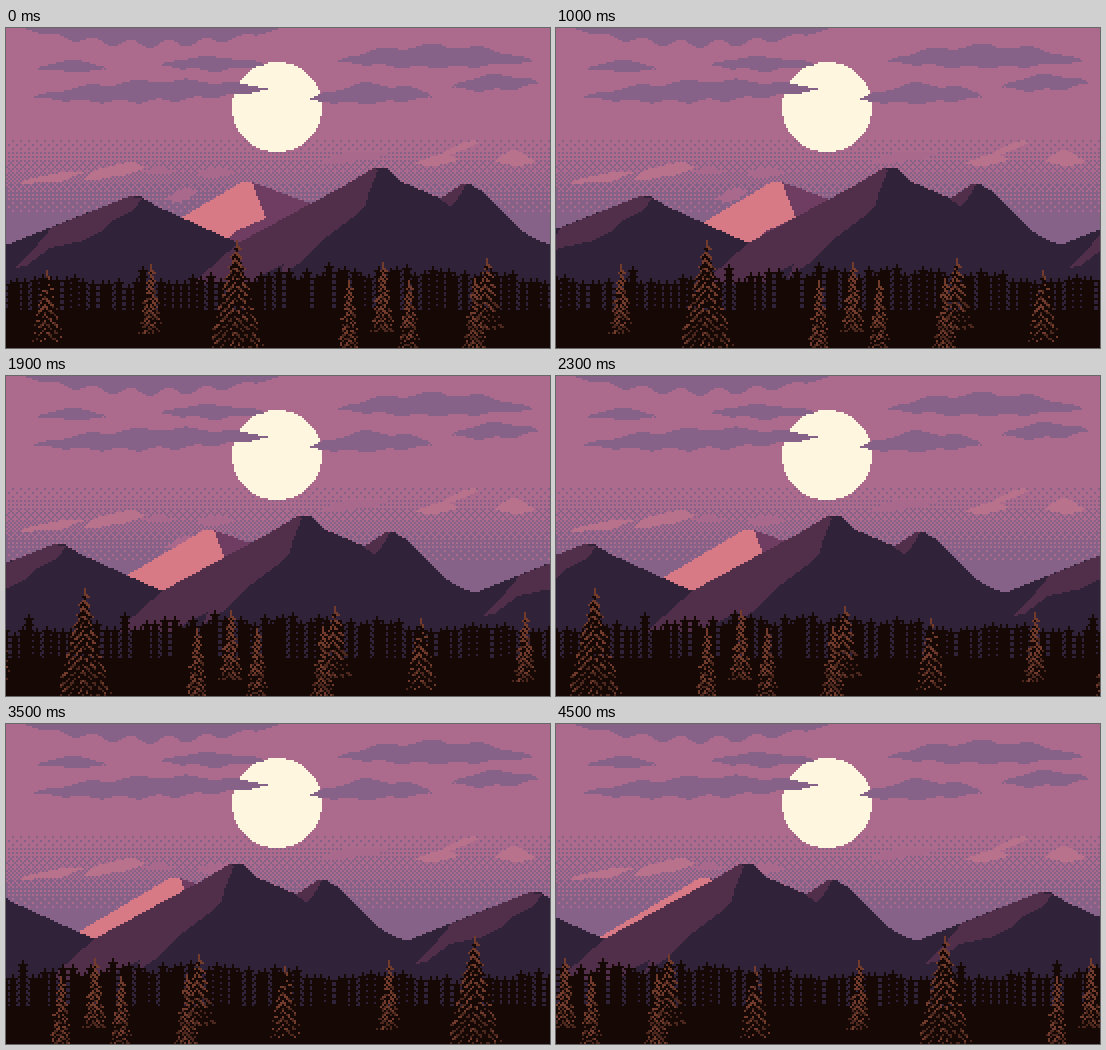
Recreate the animation shown at these times as an HTML page with a canvas. Size 544x320 px, loop 4.6 s.

```html
<!DOCTYPE html>
<html>
<head>
<meta charset="utf-8">
<style>
html, body { margin: 0; width: 100%; height: 100%; overflow: hidden; background: #ac6b8c; }
canvas { display: block; width: 544px; height: 320px; image-rendering: pixelated; }
</style>
</head>
<body>
<canvas id="stage" width="272" height="160"></canvas>
<script>
const W = 272, H = 160, FRONT = 263;
const SKY = '#ac6b8c', DUSK = '#866289', MOON = '#fff6e0', GLOW = '#b9728c', HAZE = '#a8698c';
const ROSE = '#d87a85', PLUM = '#6e3d61', MAUVE = '#512e4a', NIGHT = '#2f2239';
const BLACK = '#160805', BARK = '#733b2c', BARK_DARK = '#4c271d';

let seed = 7;
const rnd = () => (seed = seed * 16807 % 2147483647) / 2147483647;

function layer(width, draw) {
  const c = document.createElement('canvas');
  c.width = width;
  c.height = H;
  draw(c.getContext('2d'));
  return c;
}

// Hard-edged polygon; points are in stage pixels, two per cell.
function poly(g, color, text) {
  const n = text.split(/[ ,]+/).map(v => v / 2);
  g.fillStyle = color;
  for (let y = 0; y < H; y++) {
    const cuts = [], m = y + 0.5;
    for (let i = 0; i < n.length; i += 2) {
      const j = (i + 2) % n.length;
      const [x1, y1, x2, y2] = [n[i], n[i + 1], n[j], n[j + 1]];
      if ((y1 <= m) !== (y2 <= m)) cuts.push(Math.round(x1 + (m - y1) * (x2 - x1) / (y2 - y1)));
    }
    cuts.sort((a, b) => a - b);
    for (let i = 0; i + 1 < cuts.length; i += 2) g.fillRect(cuts[i], y, cuts[i + 1] - cuts[i], 1);
  }
}

// Lens with lumpy edges: rises by up, hangs by down, climbs by lift from left to right.
function cloud(g, color, x, y, w, up, down, lift = 0) {
  g.fillStyle = color;
  for (let i = 0; i < w; i++) {
    const u = (i + 0.5) / w, bulge = Math.sin(Math.PI * u) ** 0.7;
    const mid = y - lift * u;
    const top = Math.round(mid - up * bulge * (0.85 + 0.15 * Math.sin(i / 4 + x)));
    const bottom = Math.round(mid + down * bulge * (0.8 + 0.2 * Math.sin(i / 3 + y)));
    g.fillRect(x + i, top, 1, Math.max(1, bottom - top));
  }
}

// 4x4 ordered dither threshold, 0 to 15.
function bayer(x, y) {
  const quad = (a, b) => 2 * ((a ^ b) & 1) + (b & 1);
  const low = quad(y, x ^ y ^ y), high = quad(y >> 1, x >> 1);
  return 4 * ((low & 1) !== ((low >> 1) & 1) ? (y & 1 ? 3 : 2) : (y & 1 ? 1 : 0)) +
    ((high & 1) !== ((high >> 1) & 1) ? 2 : 0) + ((x ^ y) >> 1 & 1 ? 0 : (y >> 1 & 1));
}

const sky = layer(W, g => {
  g.fillStyle = SKY;
  g.fillRect(0, 0, W, H);
  g.fillStyle = DUSK;
  for (let y = 56; y < H; y++) {
    const level = Math.floor(Math.min(1, (y - 50.8) / 41) * 8) * 2;
    for (let x = 0; x < W; x++) {
      // Interleave the bits of the cell: fine parity weighs most.
      const a = x + 1, d = a ^ y;
      const rank = (d & 1) * 8 + (y & 1) * 4 + (d >> 1 & 1) * 2 + (y >> 1 & 1);
      if (reorder(rank) < level) g.fillRect(x, y, 1, 1);
    }
  }
  g.fillStyle = MOON;
  for (let d = -22; d <= 22; d++) {
    const r = Math.floor(Math.sqrt(22.5 ** 2 - d * d));
    g.fillRect(135 - r, 39 + d, 2 * r + 1, 1);
  }
  cloud(g, DUSK, 10, 0, 126, 0, 10);
  cloud(g, DUSK, 16, 20, 34, 4, 2.5);
  cloud(g, DUSK, 14, 34.5, 117, 7, 5, 4);
  cloud(g, DUSK, 78, 18, 51, 4, 4);
  cloud(g, DUSK, 166, 16.5, 97, 9, 4);
  cloud(g, DUSK, 152, 36, 61, 8, 3, 2);
  cloud(g, DUSK, 223, 29, 43, 5, 4, 2);
  cloud(g, HAZE, 70, 72, 13, 3, 2);
  cloud(g, HAZE, 95, 74, 20, 4, 2, 2);
  cloud(g, HAZE, 80, 86, 15, 4, 3, 4);
  cloud(g, HAZE, 156, 68, 35, 4, 2, 5);
  cloud(g, GLOW, 8, 77, 31, 2, 3, 5);
  cloud(g, GLOW, 39, 76, 30, 6, 2, 6);
  cloud(g, GLOW, 205, 68, 21, 4, 2, 2);
  cloud(g, GLOW, 217, 64, 19, 3, 2, 7);
  cloud(g, GLOW, 245, 67, 19, 6, 2);
});

function reorder(rank) {
  // Cells of odd parity come second, so half coverage is a checkerboard.
  return rank;
}

const far = layer(W, g => {
  poly(g, PLUM, '134,214 236,154 246,154 306,176 340,190 340,260 134,260');
  poly(g, ROSE, '120,222 134,214 236,154 246,154 251,168 260,190 228,204 216,222');
});

const near = layer(W, g => {
  poly(g, NIGHT, '0,217 124,168 134,168 150,178 232,215 306,175 334,160 368,140 380,140 392,152 436,171 454,157 464,156 480,166 511,199 523,208 544,217 544,320 0,320');
  poly(g, MAUVE, '8,240 24,226 46,199 124,168 136,171 126,183 104,194 94,204 76,213 44,220 20,238');
  poly(g, MAUVE, '186,256 232,215 306,175 334,160 368,140 372,142 362,167 360,178 346,190 318,211 300,224 258,246 246,256');
  poly(g, MAUVE, '316,212 300,230 272,250 278,236');
  poly(g, MAUVE, '434,171 454,157 460,156 450,174 444,178');
});

// Narrow spires in a jittered row; the crowns stand higher past the middle of the strip.
const forest = layer(W, g => {
  g.fillStyle = BLACK;
  g.fillRect(0, 141, W, H);
  for (let x = 2; x < W - 2; x += 3 + Math.floor(rnd() * 3)) {
    const rise = 2.5 - 2.5 * Math.cos(2 * Math.PI * (x - 55) / W);
    const top = Math.round(128 - rise - rnd() * 5 - (rnd() < 0.12 ? 4 : 0));
    for (let i = 0; top + i < H; i++) {
      const r = i < 2 ? 0 : i % 3 === 2 ? 2 : 1;
      for (const shift of [-W, 0, W]) g.fillRect(x + shift - r, top + i, 2 * r + 1, 1);
    }
  }
});

// spread: half width gained per row; gap: rows between branches; skip: share left bare.
const kinds = {
  slim: { h: 35, spread: 0.13, gap: 3, skip: 0.2 },
  wide: { h: 36, spread: 0.2, gap: 4, skip: 0.35 },
  tall: { h: 54, spread: 0.24, gap: 4, skip: 0.4 }
};

const front = layer(FRONT, g => {
  function tree(kind, cx, top) {
    const { h, spread, gap, skip } = kinds[kind];
    for (let i = 0; i < h; i++) {
      const r = Math.floor(i * spread + (i > 2 ? i % 5 * 0.4 : 0));
      for (let d = -r; d <= r; d++) {
        const a = Math.abs(d), side = d < 0 ? 0 : gap >> 1;
        const branch = (i - a + side + gap * 9) % gap < gap / 2.5;
        const lit = i < 3 || branch && rnd() > skip * (0.4 + i / h);
        if (!lit && (a === r || i > h * 0.6)) continue;
        g.fillStyle = !lit ? BLACK : rnd() < i / h * 0.8 ? BARK_DARK : BARK;
        g.fillRect((cx + d + FRONT) % FRONT, top + i, 1, 1);
      }
    }
  }
  tree('wide', 20, 121);
  tree('slim', 72, 118);
  tree('tall', 115, 106);
  tree('slim', 171, 126);
  tree('slim', 188, 117);
  tree('slim', 201, 126);
  tree('slim', 234, 125);
  tree('wide', 240, 115);
});

const ctx = document.getElementById('stage').getContext('2d');

function scroll(img, offset) {
  for (let x = -(offset % img.width); x < W; x += img.width) ctx.drawImage(img, x, 0);
}

function frame() {
  const t = performance.now() % 4600;
  const step = Math.floor(t / 100) + (t >= 2300 ? 1 : 0);  // the scroll skips one step midway
  ctx.drawImage(sky, 0, 0);
  ctx.drawImage(far, -step, 0);
  scroll(near, step * 2);
  scroll(forest, step * 3);
  scroll(front, step * 4);
  requestAnimationFrame(frame);
}
frame();
</script>
</body>
</html>
```
